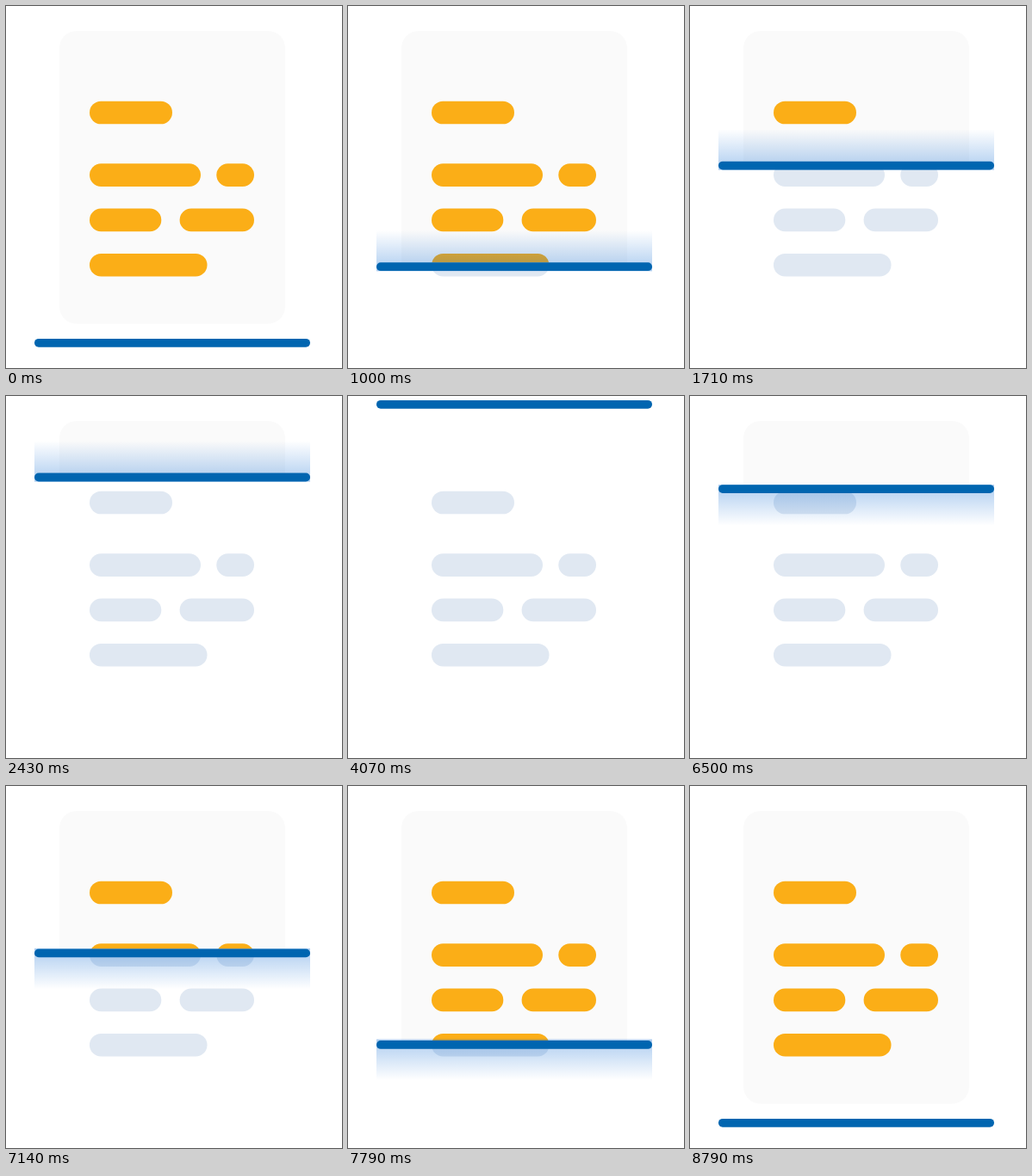
Animation, 390 px wide and 421 px high, one loop 9070 ms. Source, as an HTML page with a canvas:

```html
<!DOCTYPE html>
<html lang="en">
<head>
<meta charset="utf-8">
<title>Document scan</title>
<style>
  html, body { margin: 0; width: 100%; height: 100%; overflow: hidden; background: #fff; }
  canvas { display: block; width: 390px; height: 421px; }
</style>
</head>
<body>
<canvas id="stage"></canvas>
<script>
const W = 390, H = 421;
const LOOP = 9070, FPS = 14, SWEEP = 4400;
const TOP = 3, BOTTOM = 386.9, BAR_H = 9.8;
const GLOW_H = 47.5;

// Text lines: x, y, width
const LINES = [
  [97, 110.7, 96],
  [97, 183.3, 129], [244.3, 183.3, 43.7],
  [97, 235.6, 83.3], [201.6, 235.6, 86.4],
  [97, 287.9, 136.5]
];
const LINE_H = 26.6;

const canvas = document.getElementById('stage');
const ctx = canvas.getContext('2d');
const dpr = window.devicePixelRatio || 1;
canvas.width = Math.round(W * dpr);
canvas.height = Math.round(H * dpr);

const clamp = v => Math.max(0, Math.min(1, v));
const ramp = (t, from, to) => clamp((t - from) / (to - from));
const pulse = (t, a, b, c, d) => ramp(t, a, b) * (1 - ramp(t, c, d));

// Cubic bezier (0.275, 0, 0.375, 1)
function ease(x) {
  if (x <= 0) return 0;
  if (x >= 1) return 1;
  let lo = 0, hi = 1, u = 0.5;
  for (let i = 0; i < 30; i++) {
    u = (lo + hi) / 2;
    const v = 1 - u;
    const bx = 3 * 0.275 * u * v * v + 3 * 0.375 * u * u * v + u * u * u;
    if (bx < x) lo = u; else hi = u;
  }
  return u * u * (3 - 2 * u);
}

function pill(x, y, w, h, r, color) {
  ctx.fillStyle = color;
  ctx.beginPath();
  ctx.roundRect(x, y, w, h, r);
  ctx.fill();
}

function drawLines(color) {
  for (const [x, y, w] of LINES) pill(x, y, w, LINE_H, LINE_H / 2, color);
}

function drawGlow(t, y) {
  const rising = t < SWEEP;
  const alpha = rising
    ? pulse(t, 720, 930, 2430, 2650)
    : pulse(t, 6240, 6460, 7990, 8170);
  if (!alpha) return;
  const travel = (y - TOP) / (BOTTOM - TOP);
  const near = rising ? y + BAR_H + 0.3 : y + 0.8 - 3 * travel;
  const far = rising ? near - GLOW_H : near + GLOW_H;
  const fade = ctx.createLinearGradient(0, near, 0, far);
  fade.addColorStop(0, 'rgba(0,98,208,0.32)');
  fade.addColorStop(1, 'rgba(0,98,208,0)');
  ctx.globalAlpha = alpha;
  ctx.fillStyle = fade;
  ctx.fillRect(33, Math.min(near, far), 320, GLOW_H);
  ctx.globalAlpha = 1;
}

function draw(t) {
  const y = BOTTOM + (TOP - BOTTOM) * ease(Math.min(t, 2 * SWEEP - t) / SWEEP);
  ctx.setTransform(dpr, 0, 0, dpr, 0, 0);
  ctx.fillStyle = '#fff';
  ctx.fillRect(0, 0, W, H);
  drawLines('#e0e8f2');

  // The page shows only above the scanner bar
  ctx.save();
  ctx.beginPath();
  ctx.rect(0, 0, W, y);
  ctx.clip();
  pill(62, 29, 262, 340.5, 20, '#fafafa');
  drawLines('#fbae17');
  ctx.restore();

  drawGlow(t, y);
  pill(33, y, 320, BAR_H, BAR_H / 2, '#0065b0');
}

function tick() {
  const t = performance.now() % LOOP;
  draw(Math.floor((t + 5) * FPS / 1000) * 1000 / FPS);
  requestAnimationFrame(tick);
}
tick();
</script>
</body>
</html>
```
